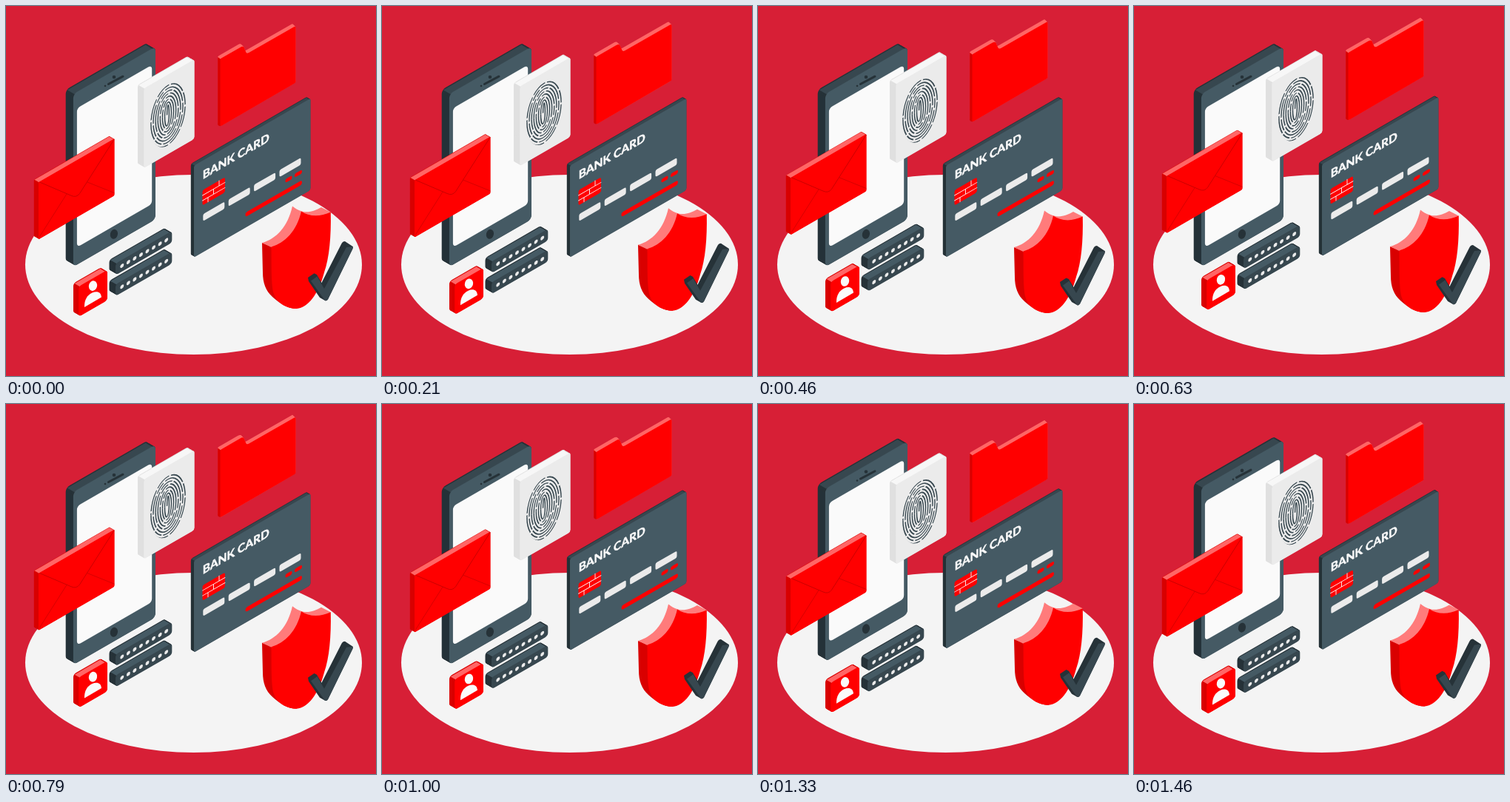
Animation of 500x500 px, one loop 1.5 s. Source, as an HTML page:

```html
<!DOCTYPE html>
<html lang="en">
<head>
<meta charset="utf-8">
<title>Secure account</title>
<style>
html, body { margin: 0; width: 100%; height: 100%; overflow: hidden; background: #d71f36; }
svg { display: block; width: 100%; height: 100%; }
text { font: 700 15.5px Lato, sans-serif; fill: #fafafa; stroke: #fafafa; stroke-width: 0.5px; }
</style>
</head>
<body>
<svg id="stage" viewBox="0 0 500 500">
  <rect width="500" height="500" fill="#d71f36"/>
  <ellipse cx="253.5" cy="349.5" rx="227.5" ry="121.5" fill="#f4f4f4"/>
</svg>
<script>
const K = 0.577; // isometric slope
const stage = document.getElementById('stage');
const RED = { front: '#ff0000', side: '#d90000', top: '#ff6666' };
const SLATE = { front: '#455a64', side: '#263238', top: '#37474f' };
const BAR = { front: '#37474f', side: '#263238', top: '#455a64' };
const PAPER = { front: '#ebebeb', side: '#e0e0e0', top: '#f7f7f7' };

const path = (d, fill, extra = '') => `<path d="${d}" fill="${fill}" ${extra}/>`;
const line = (d, color, width) =>
  path(d, 'none', `stroke="${color}" stroke-width="${width}" stroke-linecap="round" stroke-linejoin="round"`);
const rect = (x, y, w, h, r, fill) =>
  `<rect x="${x}" y="${y}" width="${w}" height="${h}" rx="${r}" fill="${fill}"/>`;
const iso = (x, y, body) => `<g transform="matrix(1 ${-K} 0 1 ${x} ${y})">${body}</g>`;

// Extruded panel; x, y is the top left corner of its front face.
function slab(x, y, w, h, depth, r, c, body = '') {
  let out = '';
  for (let d = depth; d > 0; d -= 0.5) out += iso(x - d, y - d * K, rect(0, 0, w, h, r, c.side));
  const x0 = x + r * 0.4, x1 = x + w - r * 0.6;
  const y0 = y - (x0 - x) * K + r * 0.3, y1 = y - (x1 - x) * K + r * 0.3;
  const s = depth * K;
  out += path(`M${x0} ${y0}L${x0 - depth} ${y0 - s}L${x1 - depth} ${y1 - s}L${x1} ${y1}Z`, c.top);
  return out + iso(x, y, rect(0, 0, w, h, r, c.front) + body);
}

function phone() {
  return slab(90.9, 119, 111.1, 233.5, 10.2, 5.5, SLATE,
    rect(5, 22, 101.3, 188, 5, '#fafafa')) +
    line('M138.5 105.5L158 95.2', '#263238', 3) +
    '<g fill="#263238"><circle cx="146" cy="96" r="2.3"/><circle cx="134" cy="108" r="1.3"/>' +
    '<ellipse cx="146" cy="308.3" rx="5" ry="6.6" transform="rotate(14 146 308)"/></g>';
}

function envelope() {
  const ink = '#c40000';
  return slab(44, 238.2, 102.5, 77.2, 6.2, 1.5, RED) +
    line('M45.5 238L88 256.2Q95 259.5 99.5 253.5L146 180.5', ink, 0.9) +
    line('M45.5 311.5L82 254M146 252.5L110 238', ink, 0.7);
}

// Ridges spiral outwards: each upper half ring runs on into a wider lower half.
function fingerprint() {
  const gap = 3.1;
  const tall = r => 11 + r * 1.22;
  let ridges = '';
  for (let i = 0; i < 8; i++) {
    const r = 1.4 + i * gap, low = r + gap / 2;
    const d = `M${-r} 0A${r} ${tall(r)} 0 0 1 ${r} 0A${low} ${tall(low)} 0 0 1 ${-r - gap} 0`;
    const dash = i < 2 ? '70 3' : `${22 + i * 7 % 23} 2.6 ${10 + i * 5 % 9} 2.6`;
    ridges += path(d, 'none', `stroke-dasharray="${dash}" stroke-dashoffset="${i * 13}"`);
  }
  return slab(186.3, 111.5, 68.3, 107.5, 8.3, 3, PAPER) +
    '<clipPath id="oval"><ellipse rx="24.5" ry="42"/></clipPath>' +
    iso(219, 146.5, `<g clip-path="url(#oval)" stroke="#37474f" stroke-width="1.4">${ridges}</g>`);
}

function folder() {
  const face = 'M289.5 73Q289.5 71.5 291 70.6L316.5 55.9Q320.500 53.7 321.500 55.8L324.300 62.4Q325.300 64.6 328.3 63' +
    'L389.5 28Q391.5 27 391.5 29.5V102Q391.5 103.5 390 104.4L291.5 161.8Q289.5 162.8 289.5 160.5Z';
  let out = '';
  for (let d = 3.4; d > 0; d -= 0.4)
    out += path(face, RED.top, `transform="translate(${-d} ${-d})"`);
  return out + path('M286.1 69V159.500Q286.1 161 288 162L290 162.300V71.800Z', RED.side) + path(face, RED.front);
}

function login() {
  const person = '<g fill="#fafafa"><ellipse cx="117.5" cy="378" rx="5.6" ry="6.9" transform="rotate(15 117 378)"/>' +
    '<path d="M106 407C105.5 397 110 390.500 116.500 387.500C123 384.500 128.500 386.500 129 393.500Z"/></g>';
  let out = slab(98.2, 379, 38.8, 41, 7.2, 4, RED) + person;
  for (const y of [348, 376.3]) {
    let dots = '';
    for (let i = 0; i < 8; i++) dots += `<circle cx="${8.8 + i * 8.55}" cy="8" r="2.5" fill="#ebebeb"/>`;
    out += slab(148, y, 76.3, 15.8, 8.5, 4, BAR, dots);
  }
  return out;
}

function card() {
  let body = rect(11.5, 40, 30.5, 20.500, 2.5, RED.front) +
    line('M11.500 47H42M11.500 54H42M26.500 47V54M19 54V60M34 40V47', '#fafafa', 0.9);
  for (let i = 0; i < 4; i++) body += rect(12.3 + i * 34.4, 72.8, 29, 9.4, 2.2, '#ebebeb');
  body += rect(69.5, 103.8, 76.5, 6, 3, RED.front) +
    rect(123.5, 89.8, 9, 5, 2.3, RED.front) + rect(136, 89.8, 10, 5, 2.3, RED.front) +
    '<text x="11.8" y="25.4">BANK CARD</text>';
  return slab(254, 215.6, 157.5, 124, 4.2, 2.5, SLATE, body);
}

function shield() {
  const back = 'M346 320L347 360C347 374 351 385 360 393C370 402 380 409 393 409L380 340L358.5 325Z';
  const rim = 'M346 320C365 315 381 298 387 270.5C391 274 395 276 400 277.500C409 280 418 276.5 426 272' +
    'L438.8 278.5L400 345L358.5 326Z';
  const face = 'M358.5 325.5C377 320 393 304 399 277.5C409 284.500 424 285.500 438.8 278.5' +
    'C439.5 312 437 340 430 360C422 390 408 407.5 393 409C380 409 366 402 361.5 388' +
    'C358 374 359 348 358.5 325.5Z';
  return path(back, RED.side) + path(rim, '#ff7b7b') + path(face, RED.front);
}

function tick() {
  const edge = 'L469 325.2L468.5 328L435 396.5Q433.5 399 431 398';
  return path('M408 367L416.5 361.3L420 363L426.500 374L453.500 321Q455 318 458 318' + edge +
    'L424 394L409 372Z', BAR.side) +
    path('M412 371.5L420.5 365.5L430 382L460 326' + edge + 'Z', BAR.front);
}

const groups = {};
function add(name, markup) {
  const g = document.createElementNS('http://www.w3.org/2000/svg', 'g');
  g.innerHTML = markup;
  groups[name] = stage.appendChild(g);
}
add('phone', phone());
add('float', envelope() + fingerprint() + folder() + login());
add('card', card());
add('shield', shield() + tick());

const LOOP = 1500, HALF = 750, STEPS = 36;
// Rises 10 px in half a loop and sinks back; stays at rest before its start.
const rise = t => t <= 0 ? 0 : -10 * (1 - Math.abs(t % LOOP - HALF) / HALF);
const move = (name, y) => groups[name].setAttribute('transform', `translate(0 ${y.toFixed(3)})`);

function draw(ms) {
  const step = Math.floor((ms % LOOP + 5) * STEPS / LOOP) % STEPS;
  const t = step * LOOP / STEPS;
  move('float', rise(t));
  move('card', rise(t - 500));
  move('phone', rise(t - 1000));
  move('shield', rise(t + 1000) + 20 / 3);
}

let start;
function loop(now) {
  start ??= now;
  draw(now - start);
  requestAnimationFrame(loop);
}
draw(0);
requestAnimationFrame(loop);
</script>
</body>
</html>
```
